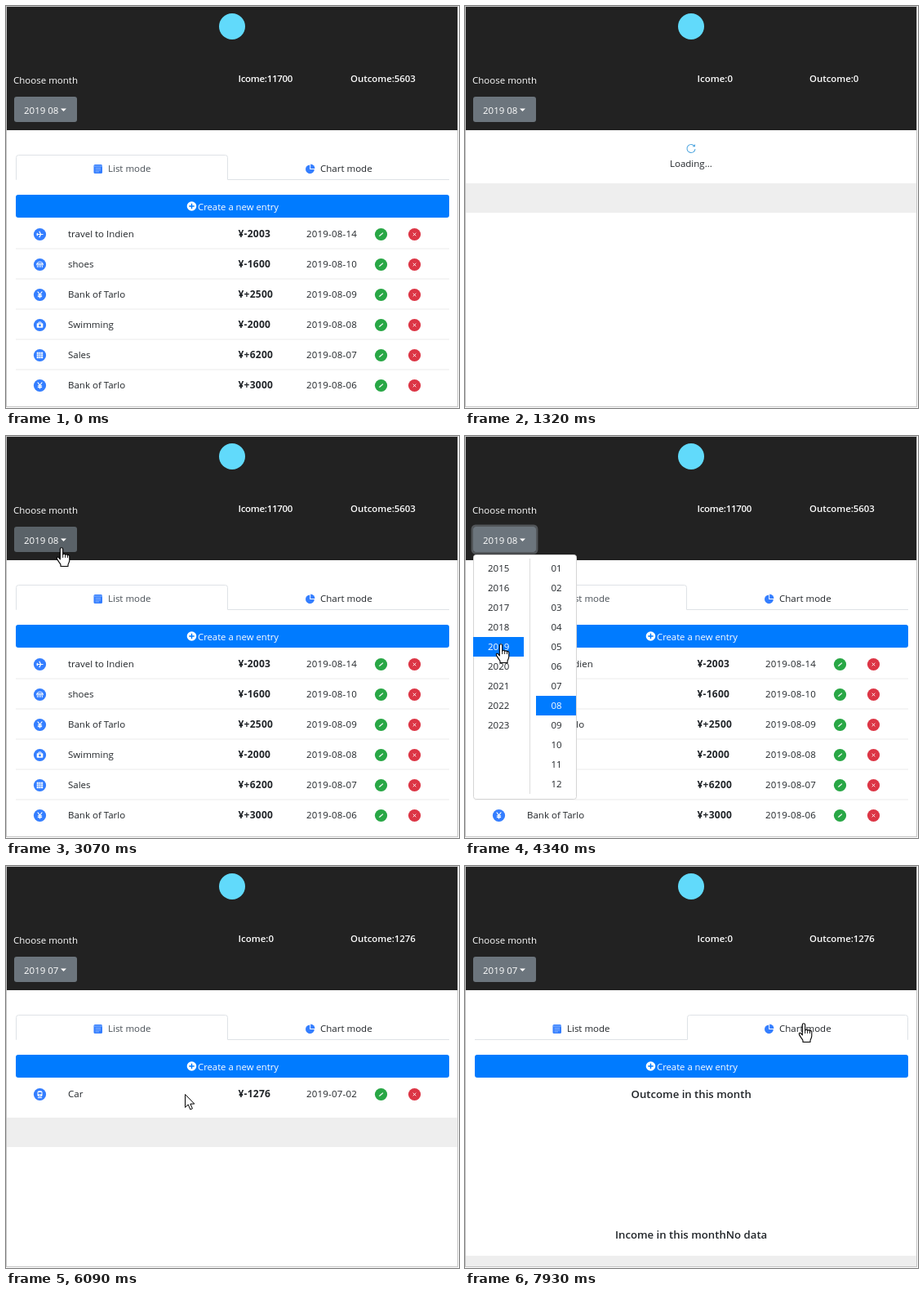
These frames come from a looping animation (555 by 492 pixels, 8000 ms). An HTML page:

```html
<!DOCTYPE html>
<html lang="en">
<head>
<meta charset="utf-8">
<title>Ledger</title>
<style>
  html, body { margin: 0; width: 100%; height: 100%; overflow: hidden; background: #fff; }
  svg { display: block; width: 555px; height: 492px; }
  text { font-family: "Open Sans", "Noto Sans", sans-serif; white-space: pre; }
</style>
</head>
<body>
<svg id="stage" viewBox="0 0 555 492"></svg>
<script>
const LOOP = 8000;
const BLUE = '#007bff', ICON = '#347eff', INK = '#212529', LINE = '#dee2e6';

// Moments of the story, in ms
const LOAD1 = [1010, 1640], OPEN = 3230, BLUR = 4420, PICK = 5370, LOAD2 = [PICK, 5770], CHART = 7530;

// Pointer path: time, x, y
const PATH = [
  [1880, 7, 198], [2500, 68, 137], [3600, 68, 137], [4260, 44, 255], [4500, 44, 255],
  [5130, 111, 306], [5480, 111, 306], [6060, 219, 279], [6180, 219, 279], [6480, 300, 347],
  [6740, 440, 298], [6980, 433, 225], [7250, 433, 225], [7450, 415, 193], [8000, 415, 193]
];

const text = (x, y, s, o = {}) =>
  `<text x="${x}" y="${y}" font-size="${o.size || 11.5}" font-weight="${o.weight || 400}" ` +
  `fill="${o.fill || INK}" letter-spacing="${o.gap || 0}">${s}</text>`;
const rect = (x, y, w, h, fill, more = '') =>
  `<rect x="${x}" y="${y}" width="${w}" height="${h}" fill="${fill}" ${more}/>`;
const disc = (x, y, r, fill) => `<circle cx="${x}" cy="${y}" r="${r}" fill="${fill}"/>`;
const path = (d, stroke, w = 1, fill = 'none') =>
  `<path d="${d}" stroke="${stroke}" stroke-width="${w}" fill="${fill}" stroke-linejoin="round"/>`;
const group = (id, body) => `<g id="${id}">${body}</g>`;
const at = (x, y, body) => `<g transform="translate(${x} ${y})">${body}</g>`;
const repeat = (n, fn) => Array.from({ length: n }, (_, i) => fn(i)).join('');

// White glyphs inside the blue row badges, centred on 0,0
const glyphs = {
  plane: path('M-4 0H4M-3.6-1.6L-2.4 0-3.6 1.6M-.8-3.8L1.2 0-.8 3.8', '#fff', 1.2),
  shoes: path('M-4 .4A4 3.8 0 0 1 4 .4ZM-3 1V3.4M-1 1V3.4M1 1V3.4M3 1V3.4M-3.8-1H3.8', '#fff', .9),
  yen: path('M-2.8-4L0-.4 2.8-4M0-.4V4M-2.6 .3H2.6M-2.6 2.1H2.6', '#fff', 1.2),
  swim: rect(-3.8, -2.2, 7.6, 5.4, '#fff', 'rx=".8"') + path('M-1.5-2.4V-3.5H1.5V-2.4', '#fff') +
    disc(0, .5, 1.4, ICON),
  grid: repeat(9, i => rect(-3.8 + i % 3 * 2.7, -3.8 + (i / 3 | 0) * 2.7, 2.1, 2.1, '#fff')),
  car: rect(-3, -4.2, 6, 7, '#fff', 'rx="1.8"') + rect(-2, -2.6, 4, 2.3, ICON, 'rx=".5"') +
    disc(0, 1.2, .8, ICON) + path('M-2.6 4.1H2.6', '#fff')
};

function row(i, [glyph, name, sum, date]) {
  const y = 279.5 + 37 * i;
  return (i ? rect(12, y - 20, 531, 1, '#ebebeb') : '') +
    at(41.5, y, disc(0, 0, 7.6, ICON) + glyphs[glyph]) +
    text(76, y + 3.7, name) +
    text(284.5, y + 3.7, '¥' + sum, { size: 12, weight: 700, gap: .25 }) +
    text(368, y + 3.7, date, { gap: .2 }) +
    at(459.5, y, disc(0, 0, 7.6, '#28a745') + path('M-2.4 2.2L-1.7 .9 2-2 2.6-1.4-1 1.7Z', '#fff', .4, '#fff')) +
    at(500.5, y, disc(0, 0, 7.6, '#dc3545') + path('M-1.8-1.8L1.8 1.8M1.8-1.8L-1.8 1.8', '#fff', .9));
}
const rows = list => list.map((r, i) => row(i, r)).join('');

const august = [
  ['plane', 'travel to Indien', '-2003', '2019-08-14'],
  ['shoes', 'shoes', '-1600', '2019-08-10'],
  ['yen', 'Bank of Tarlo', '+2500', '2019-08-09'],
  ['swim', 'Swimming', '-2000', '2019-08-08'],
  ['grid', 'Sales', '+6200', '2019-08-07'],
  ['yen', 'Bank of Tarlo', '+3000', '2019-08-06']
];
const july = [['car', 'Car', '-1276', '2019-07-02']];

const tabLine = (x0, x1) =>
  path(`M12 212.5H${x0}V185.5Q${x0} 182.5 ${x0 + 3} 182.5H${x1 - 3}Q${x1} 182.5 ${x1} 185.5V212.5H543`, LINE);

const header =
  rect(1, 1, 553, 151, '#222') + disc(277, 25, 16, '#61dafb') +
  text(9, 95, 'Choose month', { fill: '#fff' }) +
  text(284.5, 93, '', { fill: '#fff' }).replace('<text', '<text id="income"') +
  text(422, 93, '', { fill: '#fff' }).replace('<text', '<text id="outcome"') +
  rect(8.8, 109.8, 79.4, 33.4, 'none', 'id="ring" rx="4" stroke="#828a91" stroke-opacity=".5" stroke-width="2.4"') +
  rect(10, 111, 77, 31, '#6c757d', 'id="button" rx="3"') +
  text(22, 131.8, '', { fill: '#fff' }).replace('<text', '<text id="month"') +
  path('M67 125.5H74L70.5 129Z', 'none', 0, '#fff');

const tabs =
  group('listTab', tabLine(12.5, 271.5)) + group('chartTab', tabLine(272.5, 542.5)) +
  rect(107.5, 194, 10.5, 11, ICON, 'rx="1.5"') + rect(107.5, 195.6, 10.5, .8, '#a9caff') +
  path('M109.5 198.5H116M109.5 200.7H116M109.5 202.9H114', '#a9caff', .7) +
  text(125, 203, 'List mode').replace('<text', '<text id="listLabel"') +
  path('M372.2 194.4A5.4 5.4 0 1 0 377.8 200H372.2Z', 'none', 0, ICON) +
  path('M373.2 193.6A5.2 5.2 0 0 1 378.4 199H373.2Z', 'none', 0, ICON) +
  text(385, 203, 'Chart mode') +
  rect(12, 231, 531, 28, BLUE, 'rx="3"') +
  disc(227.5, 245, 5.8, '#fff') + path('M227.5 241.8V248.2M224.3 245H230.7', BLUE, 1.4) +
  text(235, 249.5, 'Create a new entry', { size: 11.3, fill: '#fff' });

const loading =
  group('spinner', path('M4.3-2.6A5 5 0 1 0 5 .6', '#55a9e0', 1.1) + path('M1.6-2.2H5V-5.6Z', 'none', 0, '#55a9e0')) +
  text(251, 197, 'Loading...') + rect(1, 217, 553, 36, '#eee');

const chart =
  text(203.5, 284, 'Outcome in this month', { size: 13.2, weight: 600 }) +
  text(184, 456, 'Income in this monthNo data', { size: 13.2, weight: 600 }) +
  rect(1, 477, 553, 13, '#eee');

const item = (x, i, s, on) => text(x, 166.3 + 24 * i, s, { fill: on ? '#fff' : INK });
const menu =
  rect(10.5, 145.5, 126, 299, '#fff', 'rx="3" stroke="#d5d5d5"') +
  rect(79, 150, 1, 288, '#dcdcdc') +
  rect(10, 246, 62, 24, BLUE) + rect(87, 318, 49, 24, BLUE) +
  repeat(9, i => item(28, i, 2015 + i, i === 4)) +
  repeat(12, i => item(105.5, i, String(i + 1).padStart(2, '0'), i === 7));

const arrow = path('M.5 .5V16.5L4.2 13 6.8 19 9.4 17.9 6.9 12.1H11.8Z', '#000', 1, '#fff');
const hand = path('M-1.7 1.5a1.7 1.7 0 0 1 3.4 0V8.2c0-1.3 3-1.2 3 .4c0-1.2 2.8-1 2.8 .6' +
  'c0-1 2.3-.8 2.3 .8V15c0 2.5-1.6 4-1.8 5.5V22.5H-1V20.5C-2 18-5 15.5-5.6 13c-.5-1.8 1.5-2.4 2.5-.8L-1.7 14Z', '#000', 1.1, '#fff') +
  path('M1.7 8V12M4.7 8.6V12M7.5 9.2V12', '#000', .9);

document.getElementById('stage').innerHTML =
  rect(0, 0, 555, 492, '#fff') + header +
  group('loading', loading) + group('tabs', tabs) +
  group('august', rows(august)) +
  group('july', rows(july) + rect(1, 308, 553, 36, '#eee')) +
  group('chart', chart) + group('menu', menu) +
  rect(.5, .5, 553, 490, 'none', 'stroke="#c4c4c4"') +
  group('pointer', group('arrow', arrow) + group('hand', hand));

const el = id => document.getElementById(id);
const show = (id, on) => { el(id).style.display = on ? '' : 'none'; };
const within = (t, [a, b]) => t >= a && t < b;
const inside = (p, x, y, w, h) => p.x >= x && p.x < x + w && p.y >= y && p.y < y + h;

function label(id, s, size, gap) {
  const node = el(id);
  node.textContent = s;
  node.setAttribute('font-weight', 600);
  node.setAttribute('font-size', size);
  node.setAttribute('letter-spacing', gap);
}

function pointerAt(t) {
  if (t < PATH[0][0]) return null;
  const i = PATH.findIndex(k => k[0] > t);
  const [t0, x0, y0] = PATH[i - 1], [t1, x1, y1] = PATH[i];
  const u = (t - t0) / (t1 - t0), e = u * u * (3 - 2 * u);
  return { x: x0 + (x1 - x0) * e, y: y0 + (y1 - y0) * e };
}

function draw(t) {
  const busy = within(t, LOAD1) || within(t, LOAD2);
  const picked = t >= PICK, charted = t >= CHART, open = within(t, [OPEN, PICK]);

  show('loading', busy);
  show('tabs', !busy);
  show('august', !busy && !picked);
  show('july', !busy && picked && !charted);
  show('chart', charted);
  show('listTab', !charted);
  show('chartTab', charted);
  show('menu', open);
  show('ring', within(t, [OPEN, BLUR]));
  el('listLabel').setAttribute('fill', charted ? INK : '#495057');
  el('spinner').setAttribute('transform', `translate(277 174.5) rotate(${(t - 1320) * .36})`);

  const full = !busy && !picked;
  label('income', 'Icome:' + (full ? 11700 : 0), 11.5, full ? -.3 : 0);
  label('outcome', 'Outcome:' + (busy ? 0 : picked ? 1276 : 5603), 11.4, 0);
  el('month').textContent = picked ? '2019 07' : '2019 08';

  const p = pointerAt(t);
  show('pointer', p);
  const hover = p && inside(p, 10, 111, 77, 31);
  el('button').setAttribute('fill', hover ? '#5a6268' : '#6c757d');
  if (!p) return;
  const link = hover || (open && inside(p, 10, 145, 126, 300)) ||
    (!busy && (inside(p, 12, 182, 531, 31) || inside(p, 12, 231, 531, 28)));
  show('hand', link);
  show('arrow', !link);
  el('pointer').setAttribute('transform', `translate(${p.x.toFixed(2)} ${p.y.toFixed(2)})`);
}

const start = performance.now();
function tick() {
  draw((performance.now() - start) % LOOP);
  requestAnimationFrame(tick);
}
tick();
</script>
</body>
</html>
```
